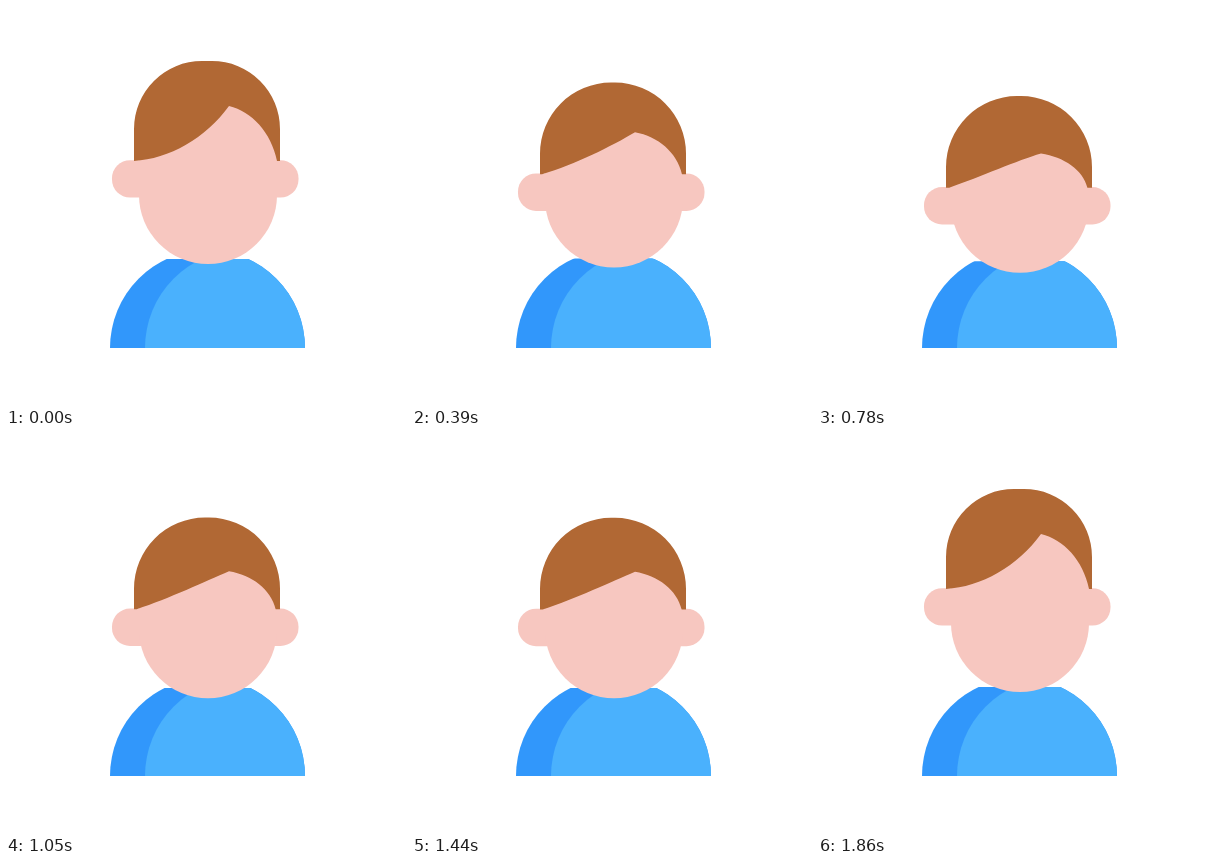
An HTML page for the animation above (4070 ms loop, 400 by 400 pixels).

```html
<!DOCTYPE html>
<html lang="en">
<head>
<meta charset="utf-8">
<title>Nodding head</title>
<style>
  html, body { margin: 0; width: 100%; height: 100%; overflow: hidden; background: #fff; }
  svg { display: block; width: 100%; height: 100%; }
</style>
</head>
<body>
<svg viewBox="0 0 400 400">
  <clipPath id="body"><ellipse cx="201.5" cy="342" rx="97.5" ry="98"/></clipPath>
  <clipPath id="shirt"><rect id="neckline" x="100" width="204" height="200"/></clipPath>
  <g clip-path="url(#shirt)">
    <g clip-path="url(#body)">
      <path fill="#3197fb" d="M100 200H304V342H100Z"/>
      <path fill="#4ab1fd" d="M139 342A97.5 98 0 0 1 236.5 244H304V342Z"/>
    </g>
  </g>
  <rect id="ears" x="106" width="186.5" height="37.4" rx="18" fill="#f7c7c0"/>
  <rect id="face" x="133" width="138" rx="69" fill="#f7c7c0"/>
  <path id="hair" fill="#b16834"/>
</svg>
<script>
const LOOP = 4070, STEP = 30;
const [neckline, ears, face, hair] = ['neckline', 'ears', 'face', 'hair']
  .map(id => document.getElementById(id));

// nod: 0 looks up, 1 looks down. calm: 1 is the taller head at rest.
const keys = [
  { time: 0, nod: 0.26, calm: 1 },
  { time: 165, nod: 0, calm: 0 },
  { time: 600, nod: 1, calm: 0 },
  { time: 960, nod: 0.6, calm: 0 },
  { time: 1290, nod: 1, calm: 0 },
  { time: 1677, nod: 0, calm: 0 },
  { time: 1860, nod: 0.26, calm: 1 }
];

const lerp = (a, b, k) => a + (b - a) * k;
const easeInOut = p => (1 - Math.cos(Math.PI * p)) / 2;

function poseAt(t) {
  const next = keys.findIndex(key => key.time > t);
  if (next < 0) return keys.at(-1);
  const from = keys[next - 1], to = keys[next];
  const k = easeInOut((t - from.time) / (to.time - from.time));
  return { nod: lerp(from.nod, to.nod, k), calm: lerp(from.calm, to.calm, k) };
}

function draw({ nod, calm }) {
  const ear = lerp(160, 209.7, nod);
  const top = lerp(50.5, 100, nod) - 8.4 * calm;
  const chin = lerp(251.1, 270.8, nod) + 1.8 * calm;
  const parting = lerp(85.5, 163, nod) - 5.6 * calm;

  neckline.setAttribute('y', lerp(247, 257.3, nod) + 3.3 * calm);
  ears.setAttribute('y', ear - 18.7);
  face.setAttribute('y', top + 6);
  face.setAttribute('height', chin - top - 6);

  // The fringe swells forward as the head goes down.
  const swell = nod * (1 - calm);
  const low = ear - 18, depth = low - parting;
  const at = height => low - depth * height;
  const r = 71 - 3 * calm;
  hair.setAttribute('d',
    `M128 ${low}H${128 + 4 * swell}` +
    `C163 ${at(0.03 + 0.37 * swell)} 200 ${at(0.42 + 0.48 * swell)} 223 ${parting}` +
    `C246 ${at(0.9)} 265 ${at(0.52)} ${271 - 2 * swell} ${low}` +
    `H274V${top + r}A${r} ${r} 0 0 0 ${274 - r} ${top}` +
    `H${128 + r}A${r} ${r} 0 0 0 128 ${top + r}Z`);
}

const start = performance.now();
function frame() {
  const t = (performance.now() - start) % LOOP;
  draw(poseAt(Math.floor(t / STEP) * STEP));
  requestAnimationFrame(frame);
}
frame();
</script>
</body>
</html>
```
